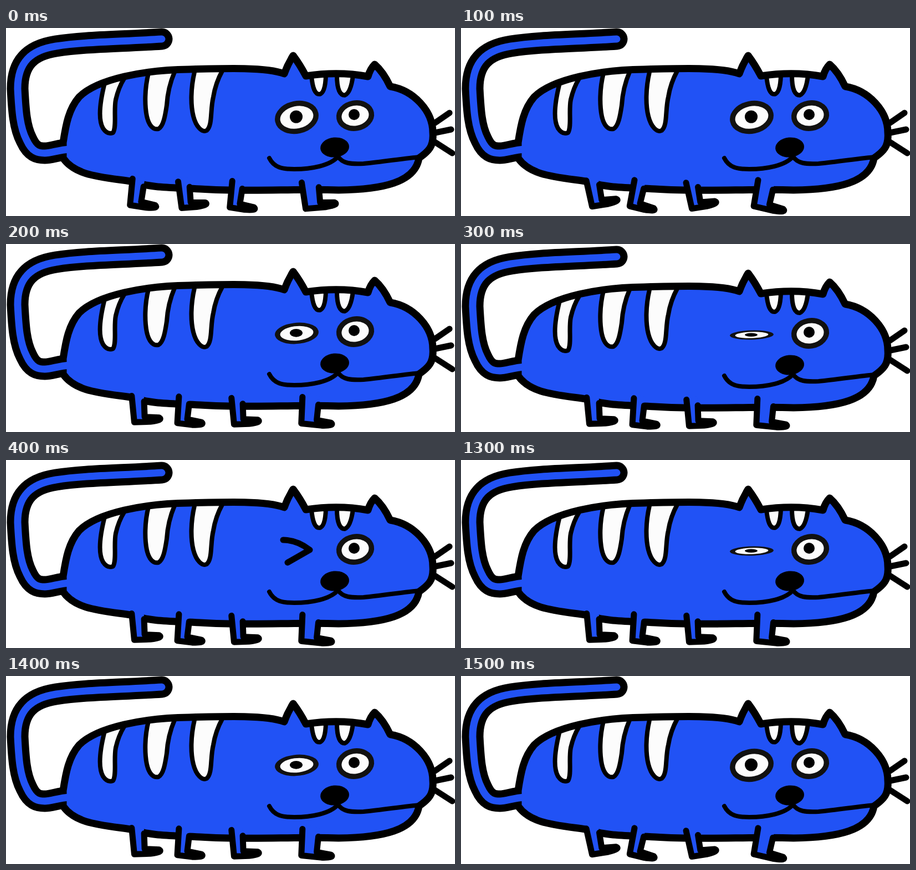
Animation of 810 by 341 pixels, one loop 1.6 s. Source, as an HTML page:

```html
<!DOCTYPE html>
<html lang="en">
<head>
<meta charset="utf-8">
<title>Winking cat</title>
<style>
html, body { margin: 0; height: 100%; overflow: hidden; background: #fff; }
svg { display: block; }
.line { fill: none; stroke: #000; stroke-width: 8; stroke-linecap: round; stroke-linejoin: round; }
.bold { stroke-width: 13; }
.mid { stroke-width: 11; }
.blue { fill: #2152f5; }
.white { fill: #fcfcfc; }
.eye { fill: #fcfcfc; stroke: #111; stroke-width: 9.5; }
.tail { stroke-width: 39; }
.core { stroke: #2152f5; stroke-width: 13; }
</style>
</head>
<body>
<svg width="810" height="341" viewBox="0 0 810 341">
  <defs>
    <path id="tail" d="M281 20 C200 25 140 25 90 33 C45 40 21 62 21 110
      C23 150 25 180 37 203 C47 225 58 227 70 227 S95 221 115 220"/>
    <path id="body" d="M103 208 C108 175 113 147 132 125 C165 92 250 76 330 75 C400 73 470 71 502 83
      Q508 66 518 50 Q530 66 541 87 Q600 78 653 88 Q657 74 665 66 Q681 80 693 106
      C735 113 770 150 770 190 C772 215 762 224 745 236 C738 280 680 293 600 294
      C520 291 440 298 350 292 C300 289 265 291 225 278 C170 270 125 268 103 236Z"/>
  </defs>
  <g id="cat">
    <use href="#tail" class="line tail"/>
    <use href="#body" class="blue"/>
    <g class="line"><path class="white" d="M178 100 C168 140 167 168 175 182 Q183 194 193 190 C200 180 194 150 198 130 Q203 108 213 92
      M257 82 C250 110 250 140 254 160 C258 178 266 185 275 183 C284 178 287 160 290 140 Q292 108 304 80
      M340 80 C333 110 333 140 338 160 C343 180 354 190 362 186 C373 176 368 150 374 125 Q378 100 390 78
      M551 86 C553 110 558 121 566 120 Q576 118 577 86
      M597 86 C597 110 602 122 611 122 Q622 118 626 86"/></g>
    <use href="#body" class="line bold"/>
    <use href="#tail" class="line core"/>
    <g id="legs"></g>
    <path class="line mid" d="M774 172 L800 154 M774 190 L803 184 M774 207 L805 227"/>
    <path class="line" d="M475 236 C484 254 500 256 520 256 C550 256 585 250 599 233 C607 246 622 247 645 246 C685 242 720 236 748 234"/>
    <ellipse cx="593" cy="216.5" rx="26" ry="18" transform="rotate(-5 593 216)"/>
    <g id="eye">
      <ellipse class="eye" rx="35" ry="25" transform="rotate(-12)"/>
      <circle cx="-1" cy="-1" r="11.5"/>
    </g>
    <path id="wink" class="line mid" d="M500 142 Q525 142 548 160 L508 183"/>
    <ellipse class="eye" cx="630" cy="159" rx="29.5" ry="23" transform="rotate(-10 630 159)"/>
    <circle cx="628" cy="157" r="10"/>
  </g>
</svg>
<script>
const $ = id => document.getElementById(id);

// One leg of half width w, swinging about its place on the belly
function leg(x, y, w, angle) {
  const d = `M${-w} -7 L${3 - w} 41 H${w + 10} Q${w + 34} 39 ${w + 26} 34 L${w} 32 V4`;
  return `<g transform="translate(${x} ${y}) rotate(${angle})">
    <path class="blue" d="${d} V-12 L${-w} -17Z"/><path class="line mid" d="${d}"/></g>`;
}

// Neighbouring legs swing in opposite directions
function legs(swing) {
  return leg(238, 282, 11, 2 + swing) + leg(321, 285, 10, 3 - swing)
    + leg(417, 286, 10, 2 + swing) + leg(549, 286, 15, 2 - swing);
}

let shown;
function draw(t) {
  // Five poses: two strides, two half-closed eyes, the held wink, then back
  const tick = Math.floor(t % 1600 / 100);
  const pose = Math.min(tick, 4, 16 - tick);
  if (pose === shown) return;
  shown = pose;
  const winking = pose === 4;
  const open = Math.min(1, 1.36 - .36 * pose);
  const drop = pose > 2 ? 3 : 0;
  $('legs').innerHTML = legs([7, -11][pose] ?? -4);
  $('cat').setAttribute('transform', `translate(0 ${drop})`);
  $('eye').setAttribute('transform', `translate(524.5 162) scale(1 ${Math.max(0, open)})`);
  $('eye').style.display = winking ? 'none' : '';
  $('wink').style.display = winking ? '' : 'none';
}

const start = performance.now();
function frame() {
  draw(performance.now() - start);
  requestAnimationFrame(frame);
}
frame();
</script>
</body>
</html>
```
